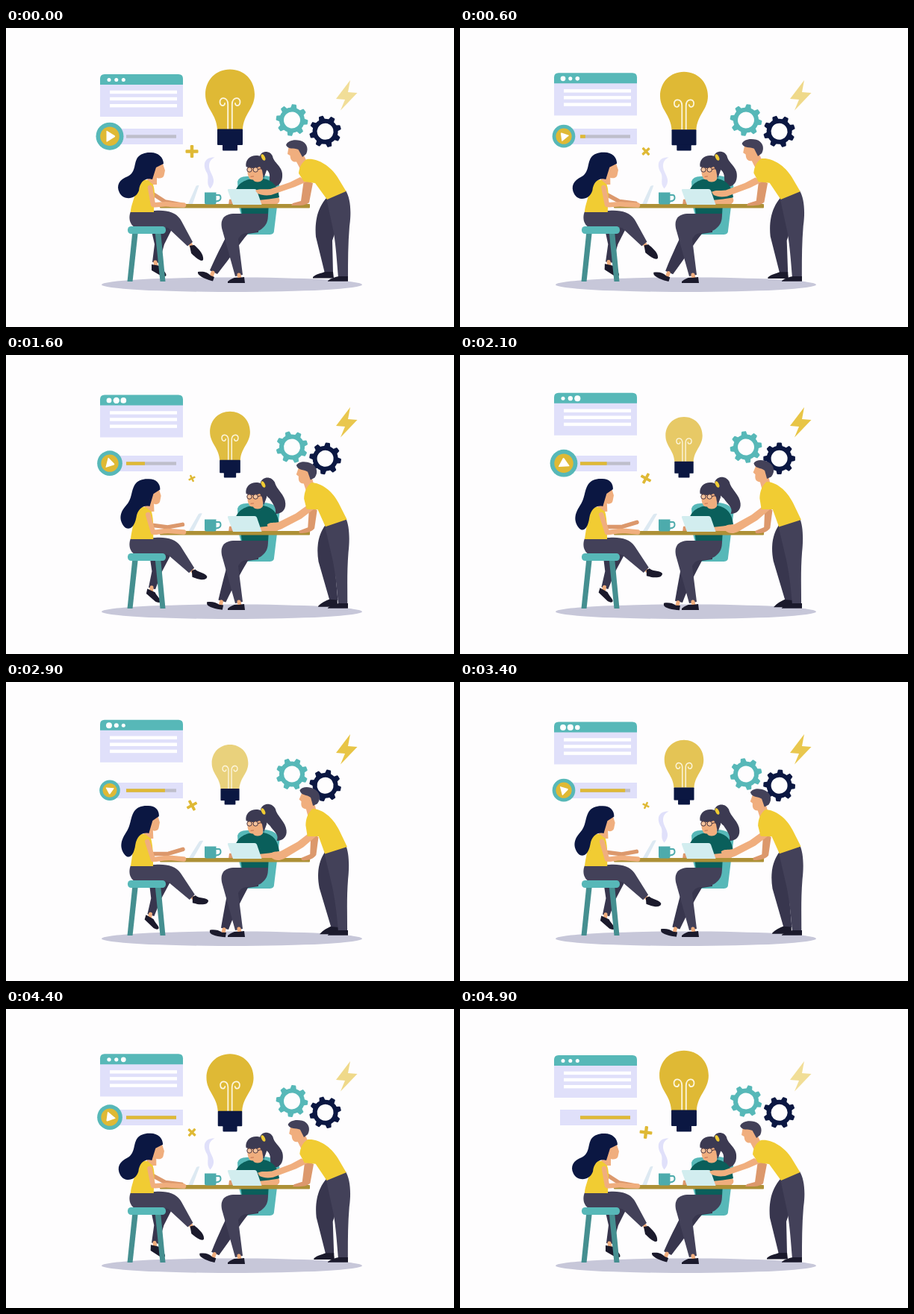
An HTML page that plays this animation: 600 by 401 pixels, repeating every 5 s.

```html
<!DOCTYPE html>
<html lang="en">
<head>
<meta charset="utf-8">
<title>Team at a table</title>
<style>
html, body { margin: 0; width: 100%; height: 100%; overflow: hidden; background: #fefdfe; }
svg { display: block; width: 100vw; height: 100vh; }
</style>
</head>
<body>
<svg id="stage" viewBox="0 0 600 401" preserveAspectRatio="none"></svg>
<script>
const LOOP = 5000, STEP = 100;
const C = {
  teal: '#57b8b8', stool: '#458f90', mug: '#4dabac', navy: '#0b1742', gold: '#dfb935', shirt: '#f1cc33',
  lilac: '#e0e0fa', skin: '#f0ae7e', shade: '#dc986c', pants: '#434159', dark: '#38364e',
  shoe: '#1b1a2c', hair: '#3c3a52', green: '#0a5f5b', wood: '#ad9036'
};
const stage = document.getElementById('stage');
const morphs = [];

function add(tag, attrs, parent = stage) {
  const el = document.createElementNS('http://www.w3.org/2000/svg', tag);
  for (const k in attrs) el.setAttribute(k, attrs[k]);
  parent.appendChild(el);
  return el;
}
const group = (parent = stage) => add('g', {}, parent);
const rect = (x, y, width, height, fill, rx = 0, parent) => add('rect', { x, y, width, height, fill, rx }, parent);
const disc = (cx, cy, r, fill, parent) => add('circle', { cx, cy, r, fill }, parent);
const numbers = d => d.match(/-?\d+(\.\d+)?/g).map(Number);

// A path that blends from the leaning pose (a) to the upright pose (b).
function shape(fill, a, b, parent) {
  const el = add('path', { d: a, fill }, parent);
  if (b) morphs.push({ el, a, from: numbers(a), to: numbers(b) });
  return el;
}
function line(stroke, width, a, b, parent) {
  const el = shape('none', a, b, parent);
  for (const [k, v] of Object.entries({
    stroke, 'stroke-width': width, 'stroke-linecap': 'round', 'stroke-linejoin': 'round'
  })) el.setAttribute(k, v);
  return el;
}

add('ellipse', { cx: 302.5, cy: 344.2, rx: 174.5, ry: 9.8, fill: '#c7c7d9' });

// Browser window
const win = group();
rect(126, 74, 111, 45, C.lilac, 0, win);
shape(C.teal, 'M126 76 V68 Q126 62 132 62 H231 Q237 62 237 68 V76Z', null, win);
const dots = [138, 147.8, 157.3].map(x => disc(x, 69.5, 2.5, '#fff', win));
for (const y of [83.8, 92.8, 102]) rect(139, y, 90, 4.4, '#fff', 0, win);

// Player
rect(134, 135, 103, 21, C.lilac);
rect(161, 143.3, 67, 4.4, '#bebecb');
const bar = rect(161, 143.3, 0, 4.4, C.gold);
const play = group();
disc(0, 0, 18.5, C.teal, play);
disc(0, 0, 12.8, C.gold, play);
const arrow = shape('#fff', 'M-4.5 -6.8 Q-4.5 -7.8 -3.5 -7.2 L6.6 -1 Q7.8 0 6.6 1 L-3.5 7.2 Q-4.5 7.8 -4.5 6.8Z', null, play);

// Gears
function gear(fill) {
  const g = group();
  add('circle', { r: 14, fill: 'none', stroke: fill, 'stroke-width': 6 }, g);
  for (let i = 0; i < 8; i++) {
    add('path', {
      d: 'M-4.3 -15 L-3.1 -20.5 Q-2.9 -21.3 -2 -21.3 H2 Q2.9 -21.3 3.1 -20.5 L4.3 -15Z',
      fill, transform: `rotate(${i * 45})`
    }, g);
  }
  return g;
}
const gearA = gear(C.teal), gearB = gear(C.navy);

const bolt = shape('#e8c546', 'M461 70 L442 95 L454 96 L448 110.5 L470.5 87 L458 86Z');

// Bulb
const bulb = group();
const glass = shape(C.gold, 'M300 55.5 C319 55.5 333 70 333 89 C333 108 318 115 317 136 H283 C282 115 267 108 267 89 C267 70 281 55.5 300 55.5Z', null, bulb);
for (const side of [1, -1]) {
  line('#fdf6df', 1.8, 'M297.2 135 V102 C297 92 286 92 286.5 99.5 C287 105.5 293 105 293 101', null, bulb)
    .setAttribute('transform', side > 0 ? '' : 'translate(600 0) scale(-1 1)');
}
rect(283, 135.5, 34, 21.5, C.navy, 1, bulb);
rect(290, 156, 20, 8.5, C.navy, 1, bulb);

const plus = group();
rect(-8.5, -2.2, 17, 4.4, C.gold, 1.2, plus);
rect(-2.2, -8.5, 4.4, 17, C.gold, 1.2, plus);

const steam = shape(C.lilac, 'M279.5 173.5 C265 173 263 184 269 194 C273 202 267 207 273.5 215.5 C281 207 278 201 274 193 C270 184 272 177 279.5 173.5Z');

// Seated woman in the chair
shape(C.teal, 'M322 199 L344 198 C359 198 368 206 366 215 L359 272 C359 276 356 277 352 277 H322 L312 240 L310 206 Q312 199 322 199Z');
shape(C.hair, 'M340 172 C342 164 354 164 357 172 C359 182 372 186 370 200 C369 210 362 214 355 213 C350 208 356 198 351 192 C346 188 344 182 346 178Z',
  'M341 171 C344 162 356 161 361 170 C363 180 375 188 376 199 C377 208 371 213 363 213 C368 204 357 199 354 193 C347 187 344 182 346 178Z');
shape(C.green, 'M325 203 C312 207 307 214 304 230 L314 235 L316 251 H351 L352 234 L366 227 C364 212 358 205 345 202Z');
shape(C.skin, 'M323.5 184 L344 182 L344 203 C341 208 332 207 331 203.5 C326 204 323.5 199 323.5 192Z');
shape(C.hair, 'M321.5 186 C320 176 328 170 337 171 C346 172 351 180 349 191 L345 202 L343 191 L340 186 C333 189 327 188 321.5 186Z');
add('ellipse', { cx: 344.5, cy: 173.5, rx: 2.3, ry: 4.6, fill: C.shirt, transform: 'rotate(-25 344.5 173.5)' });
for (const x of [326, 334.2])
  add('circle', { cx: x, cy: 190, r: 3.2, fill: '#f6c6a0', stroke: '#4a3540', 'stroke-width': 1 });
line('#4a3540', 1, 'M337.5 189.5 L343 188.5');
line('#c06a4c', 0.9, 'M328 199.3 L331.5 199');
shape(C.dark, 'M338 250 L338 274 L324 276 C312 290 302 306 283 330 L273 325 C284 300 294 282 302 266Z',
  'M338 250 L338 274 L324 276 C314 295 306 312 299 332 L289 330 C293 305 296 285 300 266Z');
line(C.skin, 5, 'M277 328 L275 333', 'M293 332 L292 337');
shape(C.pants, 'M351 249 L304 249 C290 250 286 259 290 272 L307 333 L317 331 L311 283 C314 277 318 275 324 275 C334 274 340 272 344 268 C350 263 351 257 351 249Z');
line(C.skin, 5, 'M312 331 L313 336');
shape(C.shoe, 'M257 327 C264 326 270 327 274 332 L279 334 L277 339.5 C270 338 258 333 257 329Z',
  'M274 333 C280 332 286 333 290 336 L296 336 L295 342.5 C286 342 275 340 274 336Z');
shape(C.shoe, 'M297 340 C302 336 306 334 311 335 L319 334 L320 342 H297Z');
shape(C.shade, 'M299 230 L304 229 L306 237 L298 237Z');
shape(C.skin, 'M338 231 L352 229.5 L365 227.5 C368 231 366 236 360 237 L339 236.5Z');

// Standing man
shape(C.dark, 'M430 227 C418 240 413 258 415 280 L427 329 L438 329 L437 285 L445 262 L445 230Z',
  'M427 228 C419 240 416 256 420 276 L436 329 L447 329 L442 285 L448 262 L445 230Z');
shape(C.shoe, 'M411 334 C415 330 422 329 427 327 L438 327 L439 335.5 L411 335.5Z',
  'M421 338 C425 333 431 330 435 328 L446 329 L446 338.5 L421 338.5Z');
shape(C.pants, 'M429 228 L455 218 C461 228 463 245 460 266 C458 290 458 312 458 335 L445 335 C443 310 442 295 439 275Z',
  'M426 229 L455 219 C459 228 460 245 458 264 C456 290 457 312 457 335 L445 335 C443 310 441 295 437 275Z');
shape(C.shoe, 'M431 339 C436 335 441 334 446 333 L458 333 L458 339.8 L431 339.8Z');

// Table and its objects
rect(206, 236, 201, 5.5, C.wood, 1);
line(C.mug, 2, 'M281 224 H285 Q287.5 224 287.5 228 Q287.5 232 281 232.5');
shape(C.mug, 'M266 220.5 H281.5 V234 Q281.5 236.5 279 236.5 H268.5 Q266 236.5 266 234Z');
shape('#d2edef', 'M298 216 H333 Q335 216 336 218 L342.5 237 H304 L297 218 Q296.5 216 298 216Z');
shape('#dde9f2', 'M244 236 L254.5 212 Q255.5 210.5 258.5 211 L250 236Z',
  'M245 236 L259 214 Q261 212.5 264.5 213 L251 236Z');

shape(C.shade, 'M399 203 L411 208 L406 234 C400 239 390 238 382 238 L384 235 L395 232Z',
  'M409 203 L419 208 L416 232 C412 238 404 240 397 239 L396 236 L408 231Z');
shape(C.skin, 'M394 200 L403 206 L387 213 L355 224 C347 225 342 224 337 222 L334 218 C340 215 345 217 354 216 L380 207Z',
  'M405 204 L416 207 L399 222 L375 237 C368 241 362 241 357 237 L356 231 C360 227 364 229 369 227.5 L391 215Z');
const head = group();
shape(C.skin, 'M378.5 160 L393 159 L399 171 L404 181 L394 189 L389 179.5 C383 180 381 177 380.5 171 L377 169Z', null, head);
shape(C.pants, 'M375 157 C377 151 386 149 394 151 C402 153 406 161 402 169 L397 173 L391.5 163 C385 160 379 164 375 157Z', null, head);
shape(C.shirt, 'M403 176 C416 174 434 184 444 200 L455.5 219 L430 230 L414 208 L399 206 L392 195 C393 186 396 180 403 176Z',
  'M411 169.5 C424 170 438 181 446 198 L457 221 L427 230.5 L419 207 L404 207 L402 192 C402 183 405 175 411 169.5Z');

// Woman on the stool
line(C.shade, 5.5, 'M196 222 L213 233 L235 237', 'M198 231 L218 230 L237 223.5');
shape(C.dark, 'M193 264 L226 262 L212 290 L205 315 L196 314 L199 290Z',
  'M191 264 L223 262 L208 290 L198 314 L189 311 L194 290Z');
line(C.skin, 5, 'M200 314 L201 319', 'M193 311 L192 316');
shape(C.shoe, 'M195 317 L206 319 C210 325 215 328 214.5 332 C213 334 209 333 207 332 L195 325Z',
  'M187 312 L197 318 C199 323 204 327 204 330 C203 333 199 331 197 330 L185 318Z');
for (const leg of ['M169.5 272 H177 L169.5 340 H162.5Z', 'M199.5 272 H207 L213.5 340 H206.5Z']) shape(C.stool, leg);
line(C.skin, 5, 'M246 288 L249 294', 'M248 287 L253 291');
shape(C.pants, 'M167 246 L200 245 C218 244 229 248 235 259 L250 287 L243 292.5 L217 268 C205 266 190 268 172 267 C165 262 164 254 167 246Z',
  'M167 246 L200 245 C218 244 229 248 235 258 L253 285 L246 292 L217 268 C205 266 190 268 172 267 C165 262 164 254 167 246Z');
shape(C.shoe, 'M246 292 L252 291 C259 297 265 304 264 311 C262 314 256 310 248 302Z',
  'M250 288 L254 286 C258 290 270 288 271.5 292 C271 298 262 299 250 296Z');
rect(163, 266, 51, 10, C.teal, 4.5);
shape(C.skin, 'M196 184 L210 182 L213 191 L211.5 198 C210 202 205 202 202 201 L202 210 L188 210 L192 192Z',
  'M189 181 L203 180 L205.5 188 L204 196 C203 200 198 200 196.5 199 L197 210 L183 210 L187 190Z');
shape(C.shirt, 'M180 203 L190 204 L197 210 C201 222 198 236 198 247 L167 247 C167 238 172 230 173 220 C173 212 175 206 180 203Z',
  'M177 203 L186 204 L194 210 C197 222 197 236 197 247 L167 247 C168 238 170 230 170 220 C170 212 172 206 177 203Z');
shape(C.navy, 'M192 167 C203 166 211 173 211 182 L201 187 L196 203 C186 200 179 207 178 218 C174 230 158 232 152 221 C147 211 152 203 163 199 C174 194 171 182 176 174 C180 169 186 167 192 167Z',
  'M188 166 C199 165 205 171 204.5 180 L196 186 L191 203 C182 201 175 207 173 218 C171 234 165 238 160 233 C151 222 155 212 160 203 C167 193 166 182 171 174 C175 168 181 166 188 166Z');
line(C.skin, 6.5, 'M193 214 L197 237 C205 238 210 235 222 237 L238 237.5',
  'M189 214 L197 238 C205 238 210 235 222 236 L238 237.5');

const clamp = v => Math.max(0, Math.min(1, v));
const ramp = (t, a, b) => clamp((t - a) / (b - a));
const wave = (t, period, peak = 0) => Math.cos(2 * Math.PI * (t - peak) / period);
const put = (el, x, y, turn = 0, size = 1) =>
  el.setAttribute('transform', `translate(${x} ${y}) rotate(${turn}) scale(${size})`);

function draw(t) {
  const p = (1 - wave(t, LOOP)) / 2;
  const turn = 360 * t / LOOP;

  for (const { el, a, from, to } of morphs) {
    let i = 0;
    el.setAttribute('d', a.replace(/-?\d+(\.\d+)?/g, () => (from[i] + (to[i++] - from[i - 1]) * p).toFixed(2)));
  }
  head.setAttribute('transform', `translate(${13.5 * p} ${-8.5 * p}) rotate(${14 * p} 394 180)`);
  put(win, 0, -12 * p);

  const lively = ramp(t, 0, 600) * ramp(t, 4900, 4300);
  dots.forEach((dot, i) => dot.setAttribute('r', 2.5 + 0.85 * lively * (1 + wave(t, 2050, 1100 + 400 * i))));

  const x = clamp(t / 4000);
  bar.setAttribute('width', 67 * (x + (1 - Math.cos(Math.PI * x)) / 2) / 2);

  put(play, 139, 145.2, 0, (0.87 + 0.13 * wave(t, 2000)) * ramp(t, 4700, 4400));
  put(arrow, 0, 0, -3 * turn);

  put(gearA, 383, 123.5, 8 - turn);
  put(gearB, 427.6, 138.8, turn - 16);
  put(plus, 249, 165.5, -turn, 0.74 + 0.26 * wave(t, LOOP / 2));
  bolt.setAttribute('opacity', 0.55 + 0.45 * clamp(p * 1.25));

  const s = 1 - 0.137 * (1 - wave(t, LOOP, 60));
  put(bulb, 300 - 300 * s, 164.3 - 164.3 * s, 0, s);
  glass.setAttribute('opacity', 1 - 0.4 * ((1 + wave(t, LOOP, 2650)) / 2) ** 4);
  steam.setAttribute('opacity', t < 2500 ? ramp(t, 1200, 500) : ramp(t, 2950, 3400));
}

function tick() {
  const t = performance.now() % LOOP;
  draw(Math.floor(t / STEP) * STEP);
  requestAnimationFrame(tick);
}
draw(0);
requestAnimationFrame(tick);
</script>
</body>
</html>
```
